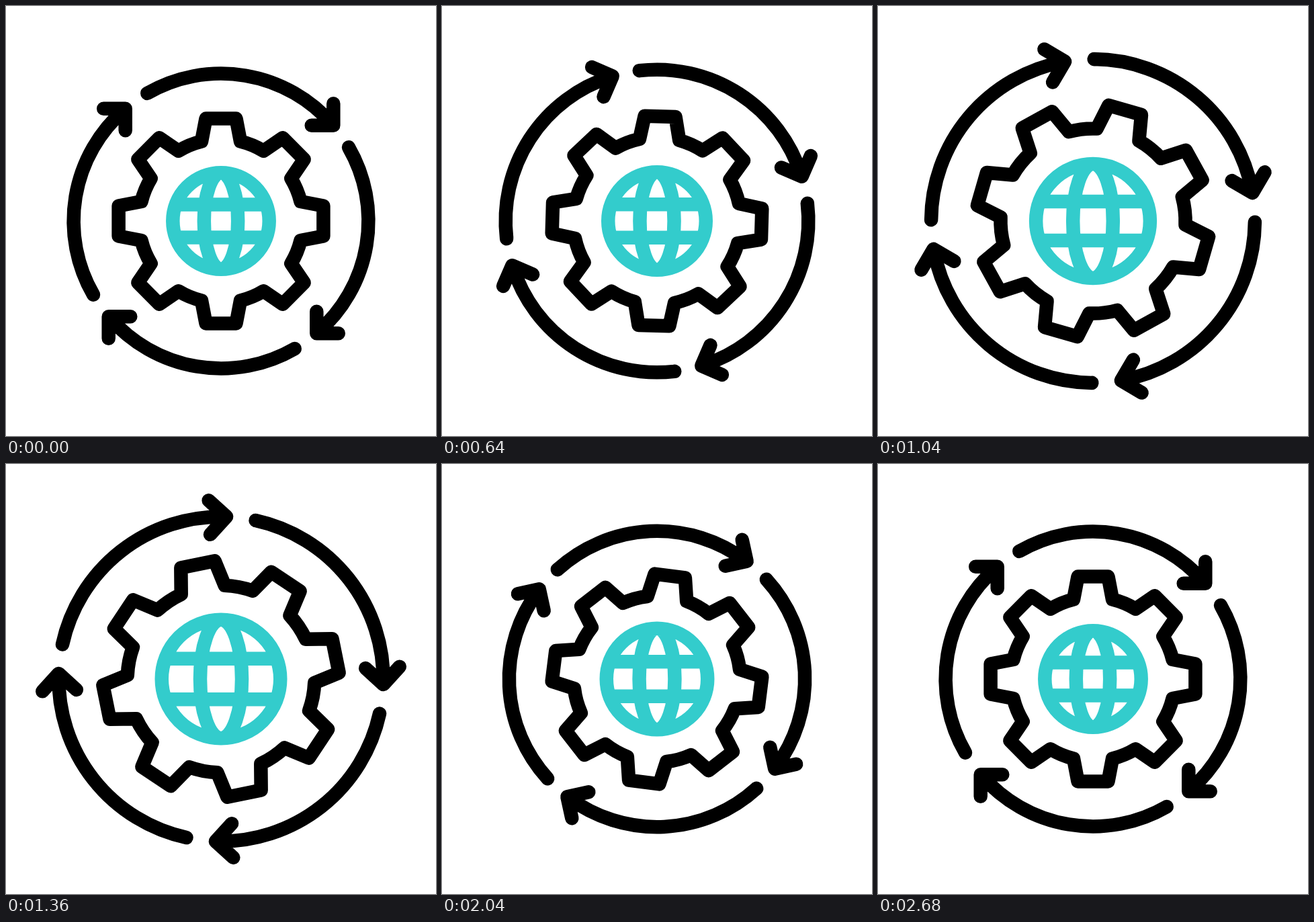
These frames come from a looping animation (640 by 640 pixels, 3 s). An HTML page with a canvas:

```html
<!DOCTYPE html>
<html lang="en">
<head>
<meta charset="utf-8">
<style>
  html, body { margin: 0; width: 100%; height: 100%; overflow: hidden; background: #fff; }
  canvas { display: block; }
</style>
</head>
<body>
<canvas id="stage" width="640" height="640"></canvas>
<script>
const ctx = document.getElementById('stage').getContext('2d');
const LOOP = 3000, STEP = 40, TAU = 2 * Math.PI, RAD = TAU / 360;

const progress = (t, start, length) => Math.min(1, Math.max(0, (t - start) / length));
const smooth = u => u * u * (3 - 2 * u);

// Same curve as cubic-bezier(x1, 0, x2, 1).
function ease(x, x1, x2) {
  let low = 0, high = 1;
  for (let i = 0; i < 24; i++) {
    const u = (low + high) / 2, v = 1 - u;
    if (3 * u * v * (v * x1 + u * x2) + u * u * u < x) low = u;
    else high = u;
  }
  return smooth(low);
}

// Grows, holds and shrinks back; each inner part follows a little later.
function pulse(t, order, amount) {
  const start = 395 + 67 * order;
  const grow = smooth(progress(t, start, 720));
  const shrink = smooth(progress(t, start + 1005, 720));
  return 1 + amount * (grow - shrink);
}

// Scales and turns the path while the line weight stays the same.
function outline(color, size, turn, build) {
  ctx.save();
  ctx.translate(320, 320);
  ctx.scale(size, size);
  ctx.rotate(turn);
  ctx.beginPath();
  build();
  ctx.restore();
  ctx.strokeStyle = color;
  ctx.stroke();
}

function ring() {
  for (let i = 0; i < 4; i++) {
    ctx.moveTo(-109.7, -190);
    ctx.arc(0, 0, 219.4, -120 * RAD, -41 * RAD);
    ctx.moveTo(134.7, -142.3);
    ctx.lineTo(167.3, -142.3);
    ctx.lineTo(167.3, -174.8);
    ctx.rotate(TAU / 4);
  }
}

function gear() {
  for (let i = 0; i < 8; i++) {
    ctx.lineTo(-22.5, -152.4);
    ctx.lineTo(22.5, -152.4);
    ctx.arc(0, 0, 122, -76.25 * RAD, -58.75 * RAD);
    ctx.rotate(TAU / 8);
  }
  ctx.closePath();
}

function globe() {
  ctx.arc(0, 0, 71.7, 0, TAU);
  ctx.moveTo(25.2, 0);
  ctx.ellipse(0, 0, 25.2, 71.7, 0, 0, TAU);
  for (const y of [-24.5, 24.5]) {
    ctx.moveTo(-67, y);
    ctx.lineTo(67, y);
  }
}

function draw(now) {
  const t = Math.floor(now % LOOP / STEP) * STEP;
  const ringTurn = TAU * ease(progress(t, 312, 2064), 0.382, 0.463);
  const gearTurn = 2 * TAU * ease(progress(t, 175, 2308), 0.509, 0.467);
  ctx.fillStyle = '#fff';
  ctx.fillRect(0, 0, 640, 640);
  ctx.lineWidth = 20.5;
  ctx.lineCap = ctx.lineJoin = 'round';
  outline('#000', pulse(t, 0, 0.101), ringTurn, ring);
  outline('#000', pulse(t, 1, 0.142), gearTurn, gear);
  outline('#33cccc', pulse(t, 2, 0.231), 0, globe);
}

const start = performance.now();
function tick() {
  draw(performance.now() - start);
  requestAnimationFrame(tick);
}
tick();
</script>
</body>
</html>
```
